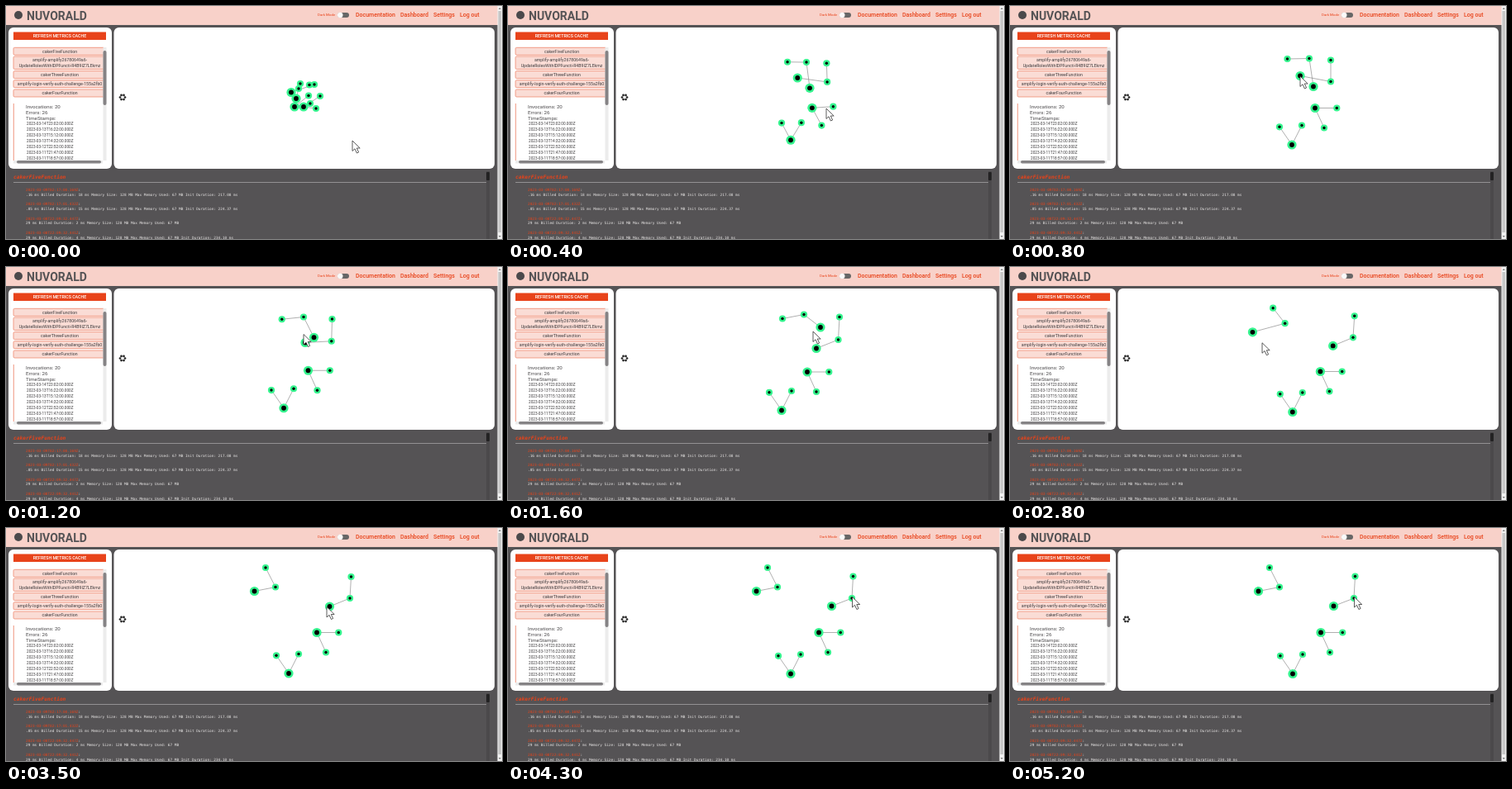
These frames come from a looping animation (600x282 px, 5.3 s). An HTML page:

```html
<!DOCTYPE html>
<html lang="en">
<head>
<meta charset="utf-8">
<title>Metrics dashboard</title>
<style>
  html, body { margin: 0; width: 100%; height: 100%; overflow: hidden; background: #555355; }
  svg { display: block; width: 600px; height: 282px; font-family: Roboto, sans-serif; }
  .red { fill: #e8431a; }
  .nav { font-size: 7px; font-weight: 500; }
  .fn rect { fill: #fadcd5; stroke: #ec7b5f; stroke-width: .7; }
  .fn text { font-size: 5.2px; text-anchor: middle; fill: #3d3b3d; }
  .stat { font-size: 6.2px; fill: #4a484a; }
  .stamp { font-size: 4.7px; fill: #3d3b3d; }
  .log { font: 4.4px "DejaVu Sans Mono", monospace; fill: #e9e7e6; white-space: pre; }
  .edge { stroke: #8d8d8d; stroke-width: .7; }
  .halo { fill: #35f48e; }
</style>
</head>
<body>
<svg viewBox="0 0 600 282">
  <defs>
    <clipPath id="list"><rect x="8" y="44" width="110" height="143"/></clipPath>
  </defs>

  <rect width="600" height="282" fill="#555355"/>
  <rect width="595" height="23" fill="#f8d1c9"/>
  <circle cx="15" cy="11" r="5" fill="#4b494b"/>
  <text x="25" y="16.5" font-size="14" font-weight="700" fill="#555355">NUVORALD</text>
  <text x="377" y="12.3" font-size="4.4" class="red">Dark Mode</text>
  <rect x="401" y="8" width="14" height="6" rx="3" fill="#666"/>
  <circle cx="404.2" cy="11" r="3.3" fill="#fafafa"/>
  <g class="red nav">
    <text x="423" y="13">Documentation</text>
    <text x="477" y="13">Dashboard</text>
    <text x="517" y="13">Settings</text>
    <text x="549" y="13">Log out</text>
  </g>

  <rect x="3" y="26" width="125" height="171" rx="6" fill="#fff"/>
  <rect x="130.5" y="26" width="460.5" height="171" rx="6" fill="#fff"/>
  <rect x="9" y="31.5" width="112" height="9.5" class="red"/>
  <text x="65" y="38.2" font-size="5.3" font-weight="500" text-anchor="middle" fill="#fff">REFRESH METRICS CACHE</text>
  <g id="panel" clip-path="url(#list)">
    <rect x="8.8" y="118" width=".8" height="70" fill="#ec7b5f"/>
  </g>
  <rect x="117.5" y="50" width="4" height="137" fill="#ececec"/>
  <rect x="117.5" y="54" width="4" height="66" rx="2" fill="#858385"/>
  <rect x="9" y="187" width="108" height="3.5" fill="#ececec"/>
  <rect x="13" y="187" width="102" height="3.5" rx="1.7" fill="#858385"/>

  <g id="spinner"></g>

  <text x="9" y="208.5" class="red" font-size="6.2" font-weight="700" font-style="italic" font-family="DejaVu Sans Mono, monospace">cakerFiveFunction</text>
  <rect x="9" y="213" width="572" height=".8" fill="#a3a1a2"/>
  <rect x="581" y="200" width="4" height="82" fill="#4b494b"/>
  <rect x="581" y="201" width="4" height="10" rx="1" fill="#232223"/>
  <g id="logs"></g>

  <rect x="594.5" width="5.5" height="282" fill="#f1f1f1"/>
  <rect x="595.5" y="6" width="3.5" height="268" fill="#c6c6c6"/>
  <path d="M595.8 4l1.5-2 1.5 2zM595.8 278l1.5 2 1.5-2z" fill="#777"/>

  <g id="graph"></g>
  <path id="cursor" d="M0 0V12.5L3 9.8 5.4 15 7.6 14 5.3 9H9.2Z" fill="#fff" stroke="#333" stroke-width=".8"/>
</svg>
<script>
const byId = id => document.getElementById(id);

function add(parent, tag, attrs, text) {
  const el = document.createElementNS("http://www.w3.org/2000/svg", tag);
  for (const k in attrs) el.setAttribute(k, attrs[k]);
  if (text) el.textContent = text;
  parent.append(el);
  return el;
}

// Function list: top, height, lines
const panel = byId("panel");
[
  [50.3, 9, "cakerFiveFunction"],
  [61, 15.5, "amplify-amplify26780649a6-", "UpdateRolesWithIDPFuncti-R4B9IZ7LEkmz"],
  [78.6, 9, "cakerThreeFunction"],
  [89.7, 9, "amplify-login-verify-auth-challenge-155a2fb0"],
  [101, 9, "cakerFourFunction"]
].forEach(([y, height, ...lines]) => {
  const g = add(panel, "g", { class: "fn" });
  add(g, "rect", { x: 9, y, width: 112, height, rx: 1.5 });
  lines.forEach((s, i) => add(g, "text", { x: 65, y: y + 6.4 + i * 6.2 }, s));
});
["Invocations: 20", "Errors: 26", "TimeStamps:"].forEach((s, i) =>
  add(panel, "text", { x: 24, y: 123.7 + i * 7, class: "stat" }, s));
["14T23:02", "13T16:22", "13T15:12", "13T14:32", "12T22:52", "11T21:47", "11T18:57"].forEach((s, i) =>
  add(panel, "text", { x: 25, y: 143.9 + i * 6.95, class: "stamp" }, `2023-03-${s}:00.000Z`));

for (let i = 0; i < 6; i++) {
  const a = i * Math.PI / 3;
  add(byId("spinner"), "circle", { cx: 141 + 3 * Math.cos(a), cy: 110.5 + 3 * Math.sin(a), r: 1.35, fill: "#222" });
}

[
  ["09T02:17:00.169", ".16 ms Billed Duration: 18 ms Memory Size: 128 MB Max Memory Used: 67 MB Init Duration: 217.08 ms"],
  ["09T02:17:01.432", ".85 ms Billed Duration: 15 ms Memory Size: 128 MB Max Memory Used: 67 MB Init Duration: 224.37 ms"],
  ["08T22:09:32.447", "29 ms Billed Duration: 2 ms Memory Size: 128 MB Max Memory Used: 67 MB"],
  ["08T22:09:32.441", "29 ms Billed Duration: 4 ms Memory Size: 128 MB Max Memory Used: 67 MB Init Duration: 234.10 ms"]
].forEach(([date, line], i) => {
  const y = 223.8 + i * 17.4;
  const head = add(byId("logs"), "text", { x: 24, y, class: "log" });
  add(head, "tspan", { class: "red" }, `2023-03-${date}Z`);
  add(head, "tspan", {}, ":");
  add(byId("logs"), "text", { x: 24, y: y + 5.8, class: "log" }, line);
});

// Graph: each path holds [x, y] at the times in KEYS
const LOOP = 5300, STEP = 100;
const KEYS = [0, 800, 1600, 2300, 3500, 4300];
const shift = (path, start, dx, dy) =>
  [start, ...path.slice(1).map(([x, y]) => [x + dx, y + dy])];

const right = [[360, 122], [369, 123.5], [362, 127], [373, 126.5], [376, 126.5], [376, 126.5]];
const low = [[349, 122], [341, 168], [331, 173.5], [341, 173.5], [342, 176], [342, 176.5]];
const paths = [
  [[351, 112], [367, 97.5], [378, 73], [265, 88], [300.5, 76.5], [300.5, 76.5]],
  [[354, 100], [362, 63.5], [358, 57.5], [359.5, 55], [326, 71.5], [326, 71.5]],
  [[356, 94], [335.5, 64], [332, 62.5], [335, 56.5], [314, 48], [314, 48]],
  [[345, 104.5], [351, 84.5], [373, 98.5], [387.5, 97], [391.5, 95], [391.5, 94.5]],
  [[373, 95], [388, 91.5], [399.5, 88], [411, 86.5], [416, 85], [416, 85]],
  [[367, 95.5], [388, 65.5], [401, 60.5], [413.5, 60.5], [417.5, 59], [417.5, 58.5]],
  right,
  shift(right, [380, 109], 26.3, 0),
  shift(right, [375, 124], 11, 24),
  low,
  shift(low, [366, 108.5], -15, -21.7),
  shift(low, [368, 118], 12, -23.5)
];
const links = [[0, 1], [1, 2], [3, 4], [4, 5], [6, 7], [6, 8], [9, 10], [9, 11]];
const pointer = [[419, 163], [351, 85], [369, 78], [255, 89.5], [388, 95.5], [416.5, 83.5]];

const graph = byId("graph");
const edges = links.map(() => add(graph, "line", { class: "edge" }));
const nodes = paths.map((_, i) => {
  const big = i % 3 === 0, g = add(graph, "g", {});
  add(g, "circle", { r: big ? 5.6 : 4.1, class: "halo" });
  add(g, "circle", { r: big ? 2.9 : 1.7 });
  return g;
});

const settle = u => 1 - (1 - u) ** 3;
const smooth = u => u * u * (3 - 2 * u);
const eases = [settle, smooth, smooth, settle, smooth];

function at(path, t, ease) {
  let i = KEYS.findLastIndex(k => k <= t);
  if (i === KEYS.length - 1) return path[i];
  const u = (ease || eases[i])((t - KEYS[i]) / (KEYS[i + 1] - KEYS[i]));
  return path[i].map((v, c) => v + (path[i + 1][c] - v) * u);
}

const place = (el, [x, y]) => el.setAttribute("transform", `translate(${x} ${y})`);

function draw(now) {
  const t = Math.floor(now % LOOP / STEP) * STEP;
  const spots = paths.map(p => at(p, t));
  nodes.forEach((n, i) => place(n, spots[i]));
  links.forEach(([a, b], i) => {
    const [x1, y1] = spots[a], [x2, y2] = spots[b];
    Object.entries({ x1, y1, x2, y2 }).forEach(([k, v]) => edges[i].setAttribute(k, v));
  });
  place(byId("cursor"), at(pointer, t, smooth));
}

const begin = performance.now();
function tick() {
  draw(performance.now() - begin);
  requestAnimationFrame(tick);
}
tick();
</script>
</body>
</html>
```
